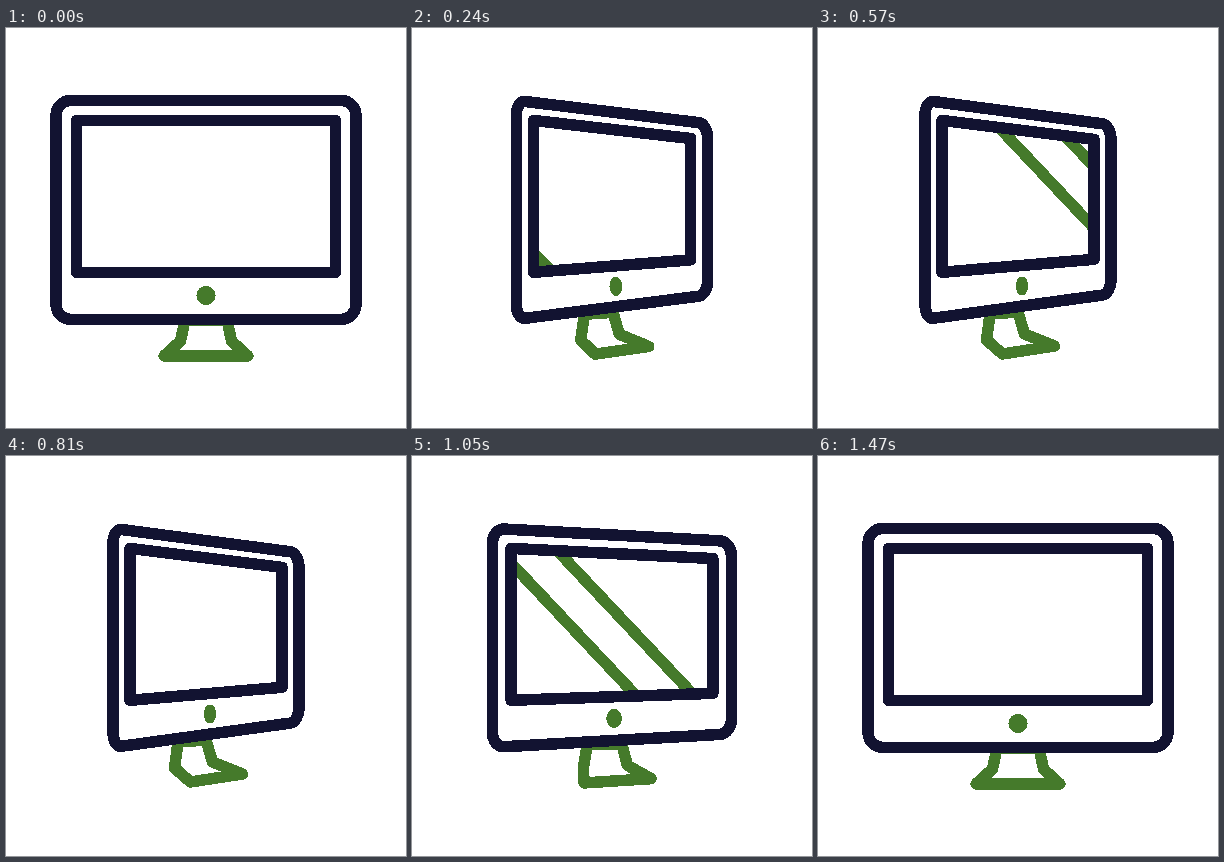
These frames come from a looping animation (400x400 px, 3.62 s). An HTML page:

```html
<!DOCTYPE html>
<html lang="en">
<head>
<meta charset="utf-8">
<title>Turning monitor</title>
<style>
  html, body { margin: 0; width: 100%; height: 100%; overflow: hidden; background: #fff; }
  svg { display: block; width: 100%; height: 100%; shape-rendering: crispEdges; }
  path { fill: none; stroke-width: 11.5; stroke-linecap: round; stroke-linejoin: round; }
  .green { stroke: #457a2b; }
  .navy { stroke: #121331; }
  ellipse { fill: #457a2b; }
</style>
</head>
<body>
<svg viewBox="0 0 400 400">
  <clipPath id="glass"><path id="pane"/></clipPath>
  <path id="stand" class="green"/>
  <g clip-path="url(#glass)"><path id="glare" class="green"/></g>
  <path id="screen" class="navy"/>
  <path id="shell" class="navy"/>
  <ellipse id="dot"/>
</svg>
<script>
const LOOP = 3620, STEP = 30, TURN = 290, BACK = 910;
const MID = 200;

// Glare stripes cross the glass at constant speed, twice.
const SWEEP = 605, SPEED = 0.714, SLOPE = 1.06, GAP = 58;

// Stand corners: front x, y and the shift when fully turned.
const standKeys = [
  [179, 292, -7, -6], [174.5, 313, -6, -1], [158, 328, 26.5, -2],
  [242, 328, -5.5, -10], [225.5, 313, -19, -7], [221, 292, -21, -8]
];

const el = id => document.getElementById(id);
const set = (id, attrs) => {
  for (const name in attrs) el(id).setAttribute(name, attrs[name]);
};
const mix = (a, b, p) => a + (b - a) * p;
const polygon = pts => 'M' + pts.join('L') + 'Z';

// Smooth step along x(s) = 1.5s - 1.5s² + s³, y(s) = 3s² - 2s³.
function ease(x) {
  if (x <= 0) return 0;
  if (x >= 1) return 1;
  let lo = 0, hi = 1;
  for (let i = 0; i < 24; i++) {
    const s = (lo + hi) / 2;
    if (1.5 * s - 1.5 * s * s + s * s * s < x) lo = s; else hi = s;
  }
  return 3 * lo * lo - 2 * lo * lo * lo;
}

// Upright panel whose right side shrinks as it turns away.
const panel = (half, top, bottom, drop, rise) => [
  [MID - half, top], [MID + half, top + drop],
  [MID + half, bottom - rise], [MID - half, bottom]
];

function rounded(pts, rx, ry) {
  const toward = (a, b, r) => {
    const f = r / Math.hypot(b[0] - a[0], b[1] - a[1]);
    return [mix(a[0], b[0], f), mix(a[1], b[1], f)];
  };
  const d = pts.map((c, i) => {
    const prev = pts[(i + 3) % 4], next = pts[(i + 1) % 4];
    const [r1, r2] = i % 2 ? [rx, ry] : [ry, rx];
    const k = 0.45;
    return toward(c, prev, r1) + 'C' + [
      toward(c, prev, r1 * k), toward(c, next, r2 * k), toward(c, next, r2)
    ].join(' ');
  });
  return polygon(d);
}

function stripe(x) {
  const reach = 150;
  return `M${x - reach},${168 - reach * SLOPE}L${x + reach},${168 + reach * SLOPE}`;
}

function glarePath(t) {
  const at = start => 185.5 + SPEED * (t - start);
  return [1050 - SWEEP, 1050]
    .map(start => stripe(at(start) - GAP / 2) + stripe(at(start) + GAP / 2))
    .join('');
}

function draw(t) {
  const p = ease(t / TURN) - ease((t - BACK) / TURN);
  const glass = polygon(panel(129.5 - 53.5 * p, 92.4, 244.3, 19 * p, 13 * p));
  const shell = panel(150 - 57 * p, 72.4, 291.4, 24.5 * p, 25.5 * p);
  set('pane', { d: glass });
  set('screen', { d: glass });
  set('shell', { d: rounded(shell, 15 - 6.5 * p, 15) });
  set('stand', { d: polygon(standKeys.map(([x, y, dx, dy]) => [x + dx * p, y + dy * p])) });
  set('glare', { d: glarePath(t) });
  set('dot', { cx: MID + 4 * p, cy: 267.5 - 9.5 * p, rx: 9.6 - 3.4 * p, ry: 9.6 });
}

const start = performance.now();
function tick() {
  const t = (performance.now() - start) % LOOP;
  draw(Math.floor(t / STEP) * STEP);
  requestAnimationFrame(tick);
}
tick();
</script>
</body>
</html>
```
